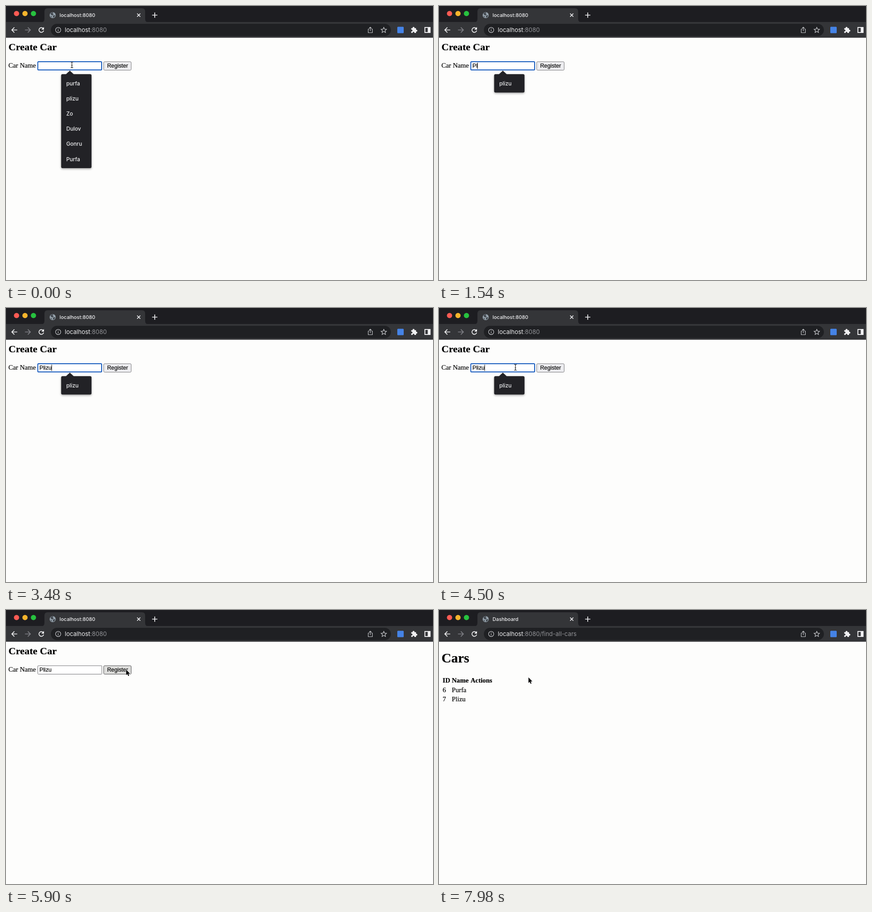
Recreate the animation shown at these times as an HTML page. Size 933 by 600 pixels, loop 8 s.

```html
<!DOCTYPE html>
<html lang="en">
<head>
<meta charset="utf-8">
<title>Register a car</title>
<style>
  html, body { margin: 0; width: 100%; height: 100%; overflow: hidden; background: #fdfdfc; }
  svg { display: block; width: 100vw; height: 100vh; }
  .ui { font-family: Inter, sans-serif; fill: #f1f1f3; }
  .tab { font-size: 10.85px; font-weight: 500; }
  .url { font-size: 13px; }
  .item { font-size: 11.7px; font-weight: 500; }
  .field { font: 12.27px "Liberation Sans", Arial, sans-serif; }
  .page { font: 14.7px "Liberation Serif", serif; }
  .field, .page { stroke: #000; stroke-width: .2; }
  .bold { font-weight: bold; }
  .icon { fill: none; stroke: #f1f1f3; stroke-width: 1.7; }
  .thin { stroke: #c4c5c9; stroke-width: 1.2; }
</style>
</head>
<body>
<svg viewBox="0 0 933 600" xmlns="http://www.w3.org/2000/svg">
  <defs>
    <filter id="shade" x="-20%" y="-20%" width="140%" height="150%">
      <feDropShadow dx="0" dy="2" stdDeviation="2" flood-color="#000" flood-opacity=".35"/>
    </filter>
  </defs>
  <rect width="933" height="600" fill="#fdfdfc"/>

  <!-- browser frame -->
  <rect width="933" height="36" fill="#1d1d21"/>
  <path d="M76 36q8 0 8-8V12q0-7 7-7h206q7 0 7 7v16q0 8 8 8z" fill="#343538"/>
  <rect y="35" width="933" height="34.5" fill="#343538"/>
  <rect x="98" y="39" width="743" height="27" rx="13.5" fill="#1f2023"/>
  <circle cx="23" cy="16.5" r="5.7" fill="#fc5b54"/>
  <circle cx="41.5" cy="16.5" r="5.7" fill="#f6b42c"/>
  <circle cx="60" cy="16.5" r="5.7" fill="#27c23f"/>
  <g id="globe">
    <circle cx="102" cy="20" r="6.6" fill="#97a3ad"/>
    <path d="M97 16.5q3-3 6-2.3l-1 2.6 2.2 1.2-2 2.4-3-.4zM102.5 21l4-1 1 1.5-2.4 3.6-2.2.4zM97 21.5l3 1.2.5 2.6q-3-1-3.5-3.8z" fill="#42484f"/>
  </g>
  <text id="title" class="ui tab" x="117" y="24"></text>
  <path class="icon" d="M286.5 16.5l7 7m0-7l-7 7M319.3 20h11.4M325 14.3v11.4"/>
  <path class="icon" d="M24.5 52.5H13M18.3 46.8l-5.6 5.7 5.6 5.7"/>
  <path class="icon" style="stroke:#808186" d="M41.5 52.5H53M47.7 46.8l5.6 5.7-5.6 5.7"/>
  <g id="reload">
    <path class="icon" d="M81.3 49.2a5.2 5.2 0 1 0 1 4.6"/>
    <path d="M83 46v5.7h-5.7z" fill="#f1f1f3"/>
  </g>
  <path id="stop" class="icon" d="M72.5 47.8l9.3 9.3m0-9.3l-9.3 9.3"/>
  <circle class="icon thin" cx="114" cy="52.5" r="5.7"/>
  <path class="icon thin" d="M114 51.5v4M114 49v1.3"/>
  <text class="ui url" x="128.5" y="57">localhost<tspan id="rest" fill="#929397"></tspan></text>
  <path class="icon thin" d="M793.5 50.5h-2v8h9v-8h-2M796 55v-8.5m-2.7 2.5l2.7-2.7 2.7 2.7"/>
  <path class="icon thin" d="M825.5 46.7l1.7 3.9 4.3.4-3.2 2.8 1 4.2-3.8-2.2-3.8 2.2 1-4.2-3.2-2.8 4.3-.4z"/>
  <rect x="855" y="45.5" width="14" height="14" rx="1.5" fill="#4583e6"/>
  <path d="M885.5 48.5h3a2.1 2.1 0 1 1 4 0h3.5v3.5a2.1 2.1 0 1 1 0 4v3h-3.8a1.9 1.9 0 1 0-3.6 0h-3.1v-3.7a1.9 1.9 0 1 0 0-3.5z" fill="#f1f1f3"/>
  <rect class="icon" x="915.3" y="47" width="11.4" height="11" style="stroke-width:1.9"/>
  <path d="M921.5 47h5v11h-5z" fill="#f1f1f3"/>

  <g id="form">
    <text class="page bold" x="5.5" y="97.3" style="font-size:22px">Create Car</text>
    <text class="page" x="5.3" y="135">Car Name</text>
    <rect id="box" fill="#fff"/>
    <text id="typed" class="field" x="73" y="135.3"></text>
    <rect id="caret" y="124" width="1" height="14" fill="#000"/>
    <rect id="button" x="213.5" y="122" width="60" height="18.5" rx="2"/>
    <text class="field" x="243.8" y="135.3" text-anchor="middle">Register</text>
    <g id="popup" filter="url(#shade)">
      <path d="M130.5 150l9-8.5 9 8.5z" fill="#222326"/>
      <rect id="panel" x="120.5" y="149.2" width="66.3" rx="3" fill="#222326"/>
      <g id="items"></g>
    </g>
  </g>

  <g id="list">
    <text class="page bold" x="5.5" y="115.3" style="font-size:29.4px">Cars</text>
    <g id="cells"></g>
  </g>

  <path id="beam" d="M-2.8-6.5q2.8 0 2.8 2v9q0 2-2.8 2M2.8-6.5q-2.8 0-2.8 2M2.8 6.5q-2.8 0-2.8-2M-1.5 1h3" fill="none" stroke="#222" stroke-width="1.2"/>
  <path id="arrow" d="M.5-.5V11.7L3.2 9.2 5.1 13.6 7.1 12.7 5.3 8.5H9z" fill="#000" stroke="#fff" stroke-width="1.4" paint-order="stroke"/>
</svg>
<script>
const $ = id => document.getElementById(id);
const LOOP = 8000;
const WORD = "Plizu";
const NAMES = ["purfa", "plizu", "Zo", "Dulov", "Gonru", "Purfa"];
const KEYS = [1000, 1480, 1860, 2340, 3100];      // key presses
const HIDE = 640, SHOW = 4220;                    // pointer is hidden while typing
const BLUR = 5600, PRESS = 6260, RELEASE = 6420;
const LOAD = 6880, PAGE = 7340, READY = 7480;
const PATH = [                                    // time, x, y
  [0, 144, 129], [4240, 144, 129], [4480, 167, 130], [4560, 167, 130],
  [4900, 342, 180], [5060, 342, 180], [5480, 262, 131], [6140, 262, 131],
  [6560, 258, 130], [7340, 258, 130], [7900, 195, 148], [8000, 195, 148]
];

function set(el, attrs) {
  for (const key in attrs) el.setAttribute(key, attrs[key]);
}

function label(parent, text, x, y, cls) {
  const el = document.createElementNS("http://www.w3.org/2000/svg", "text");
  el.textContent = text;
  set(el, { x, y, class: cls });
  parent.appendChild(el);
}

function show(id, on) {
  $(id).style.display = on ? "" : "none";
}

const inside = (p, x0, y0, x1, y1) => p.x >= x0 && p.x <= x1 && p.y >= y0 && p.y <= y1;

function pointerAt(t) {
  const i = Math.max(1, PATH.findIndex(p => p[0] > t));
  const [t0, x0, y0] = PATH[i - 1], [t1, x1, y1] = PATH[i];
  const k = (t - t0) / (t1 - t0), e = k * k * (3 - 2 * k);
  return { x: x0 + (x1 - x0) * e, y: y0 + (y1 - y0) * e };
}

let shown = "";
function drawPopup(prefix) {
  const names = NAMES.filter(n => n.toLowerCase().startsWith(prefix.toLowerCase()));
  const key = names.join();
  if (key === shown) return;
  shown = key;
  set($("panel"), { height: 7.3 + 33.1 * names.length });
  $("items").replaceChildren();
  names.forEach((n, i) => label($("items"), n, 131.8, 174 + 33.1 * i, "ui item"));
}

function drawField(t, typed) {
  const focus = t < BLUR;
  set($("box"), focus
    ? { x: 69.5, y: 122, width: 139.5, height: 18, rx: 1.5, stroke: "#1459bd", "stroke-width": 2 }
    : { x: 69.5, y: 122, width: 140, height: 18.5, rx: 1, stroke: "#707074", "stroke-width": 1 });
  $("typed").textContent = typed;
  const start = typed ? KEYS[typed.length - 1] : 400;
  const phase = (t - start + LOOP) % 1000;
  show("caret", focus && phase < 500);
  set($("caret"), { x: 72.8 + (typed ? $("typed").getComputedTextLength() : 0) });
}

function drawButton(t, hover) {
  const down = t >= PRESS && t < RELEASE;
  set($("button"), {
    fill: down ? "#f5f5f5" : hover ? "#dededc" : "#ededf0",
    stroke: hover && !down ? "#4e4e50" : "#77777a"
  });
}

function render(t) {
  const p = pointerAt(t), onForm = t < PAGE;
  const typed = WORD.slice(0, KEYS.filter(k => k <= t).length);
  const onField = onForm && inside(p, 69, 121, 210, 141);
  const visible = t < HIDE || t >= SHOW;

  show("form", onForm);
  show("list", !onForm);
  if (onForm) {
    drawField(t, typed);
    drawPopup(typed);
    drawButton(t, visible && inside(p, 213, 121, 274, 141));
    show("popup", t < BLUR);
  }

  const loading = t >= LOAD && t < READY;
  show("globe", !loading);
  show("stop", loading);
  show("reload", !loading);
  const rest = t < LOAD ? ":8080" : ":8080/find-all-cars";
  $("rest").textContent = rest;
  $("title").textContent = onForm ? "localhost" + rest : "Dashboard";

  show("beam", visible && onField);
  show("arrow", visible && !onField);
  const move = `translate(${p.x} ${p.y})`;
  set($("beam"), { transform: move });
  set($("arrow"), { transform: move });
}

[["ID", "Name", "Actions"], ["6", "Purfa"], ["7", WORD]].forEach((row, r) =>
  row.forEach((cell, c) =>
    label($("cells"), cell, [8, 28, 69][c], 159.3 + 20.3 * r, r ? "page" : "page bold")));

const begin = performance.now();
function tick() {
  render((performance.now() - begin) % LOOP);
  requestAnimationFrame(tick);
}
tick();
</script>
</body>
</html>
```
